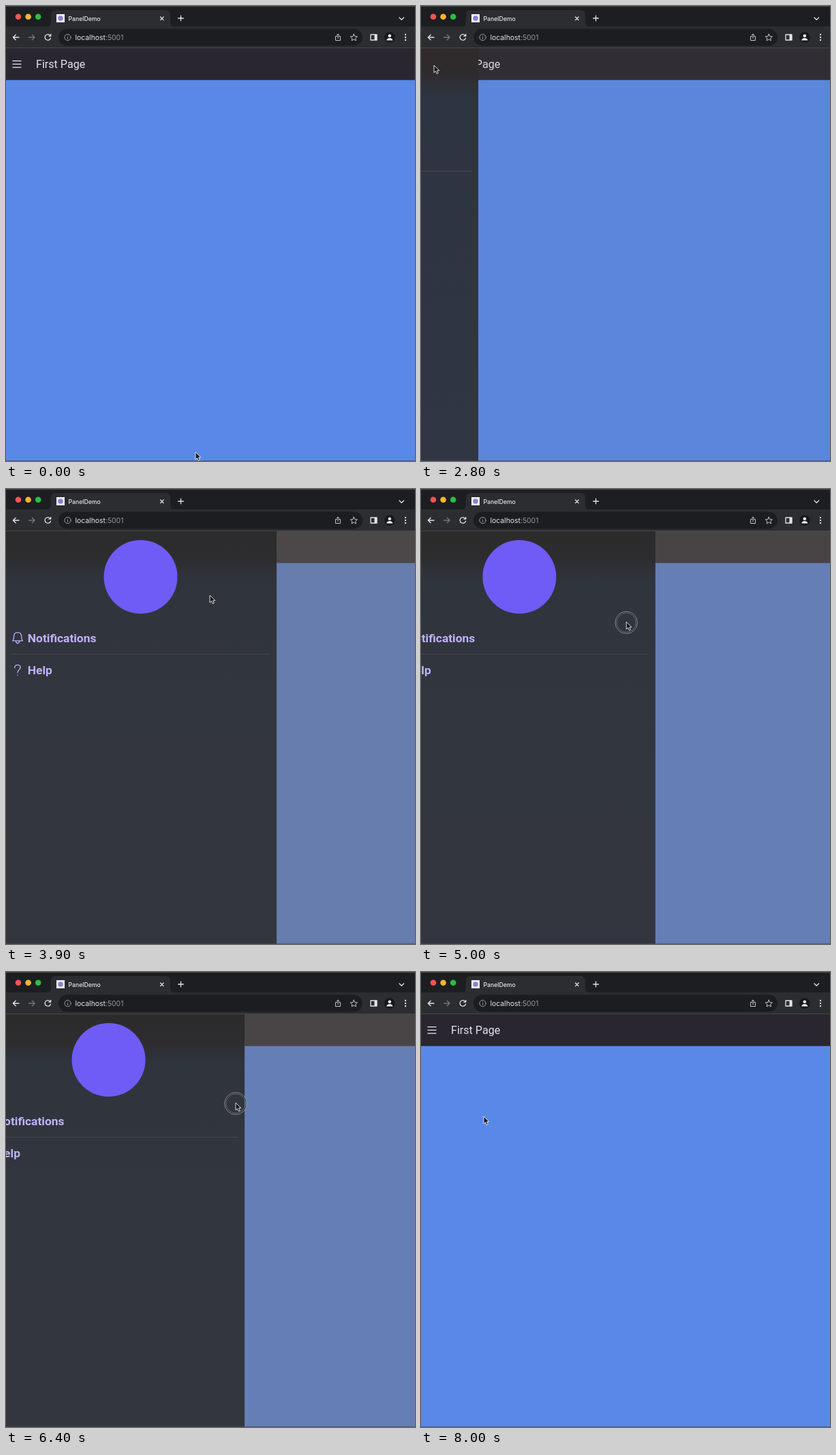
Recreate the animation shown at these times as an HTML page. Size 600 by 668 pixels, loop 8200 ms.

```html
<!DOCTYPE html>
<html lang="en">
<head>
<meta charset="utf-8">
<title>Drawer demo</title>
<style>
  html, body { margin: 0; width: 100%; height: 100%; overflow: hidden; background: #1d1e21; }
  svg { display: block; width: 100vw; height: 100vh; }
  .ui { font-family: Inter, Roboto, sans-serif; }
  .app { font-family: Roboto, Inter, sans-serif; }
  .icon, .lilac { fill: none; stroke-width: 1.3; stroke-linecap: round; stroke-linejoin: round; }
  .icon { stroke: #e4e5e7; }
  .lilac { stroke: #c0b2fa; }
  .fine { stroke: #c4c6c9; stroke-width: 1; }
  .muted { stroke: #9c9ea2; }
  .item { font-size: 17.4px; font-weight: 600; fill: #c0b2fa; }
</style>
</head>
<body>
<svg viewBox="0 0 600 668">
  <defs>
    <linearGradient id="panel" gradientUnits="userSpaceOnUse" x1="0" y1="62" x2="0" y2="668">
      <stop offset="0" stop-color="#2b2b2c"/>
      <stop offset=".06" stop-color="#2d2c2e"/>
      <stop offset=".115" stop-color="#2f343c"/>
      <stop offset=".4" stop-color="#32363e"/>
      <stop offset="1" stop-color="#34363d"/>
    </linearGradient>
    <linearGradient id="tint" gradientUnits="userSpaceOnUse" x1="0" y1="62" x2="0" y2="668">
      <stop offset="0" stop-color="#33292a"/>
      <stop offset=".06" stop-color="#2f2b2d"/>
      <stop offset=".12" stop-color="#2c3542"/>
      <stop offset="1" stop-color="#2f3644"/>
    </linearGradient>
    <clipPath id="page"><rect y="62" width="600" height="606"/></clipPath>
  </defs>

  <!-- Page -->
  <rect y="62" width="600" height="606" fill="#5988e8"/>
  <rect y="62" width="600" height="46.7" fill="#29262f"/>
  <path d="M9.5 80.7h13M9.5 85.4h13M9.5 90.1h13" stroke="#e9e7ec" stroke-width="1.2"/>
  <text class="app" x="44" y="91" font-size="16.1" fill="#e6e1e9">First Page</text>
  <rect id="scrim" y="62" width="600" height="606" fill="#777068"/>

  <!-- Drawer -->
  <g clip-path="url(#page)">
    <g id="drawer">
      <rect y="62" width="397" height="606" fill="url(#panel)"/>
      <rect id="cool" y="62" width="397" height="606" fill="url(#tint)"/>
      <circle cx="197.5" cy="129" r="54" fill="#6f5bf5"/>
      <g class="lilac">
        <path d="M9.8 222.9c1.4-1.6 1.8-3 1.8-6.4 0-3.7 2.2-5.9 5.5-5.9s5.5 2.2 5.5 5.900c0 3.400.4 4.800 1.800 6.400zM14.500 223.500c.3 2 1.300 3 2.600 3s2.300-1 2.600-3"/>
        <path d="M12.700 262.500c0-2.600 1.800-4.100 4.200-4.100s4.200 1.500 4.200 3.900c0 3.200-4.200 3.500-4.200 7.400M16.900 273.200v.2"/>
      </g>
      <text class="app item" x="31.8" y="224.5">Notifications</text>
      <text class="app item" x="31.8" y="272">Help</text>
      <path d="M8 242.500h380" stroke="#49444f"/>
    </g>
  </g>

  <!-- Browser frame -->
  <rect width="600" height="31" fill="#1d1e21"/>
  <rect width="600" height="1" fill="#4b4c4e"/>
  <rect y="30" width="600" height="32" fill="#2c2d31"/>
  <path d="M59 30.500q7 0 7-7V13q0-7 7-7h161q7 0 7 7v10.500q0 7 7 7z" fill="#2c2d31"/>
  <rect y="61" width="600" height="1" fill="#46474a"/>
  <circle cx="18" cy="15.800" r="4.300" fill="#fe5257"/>
  <circle cx="32.600" cy="15.800" r="4.300" fill="#fbb52e"/>
  <circle cx="47.200" cy="15.800" r="4.300" fill="#27c13f"/>
  <rect x="74" y="12" width="12" height="12" fill="#f4f4f8"/>
  <circle cx="80" cy="18" r="3.800" fill="#8583d8"/>
  <text class="ui" x="91.500" y="21.500" font-size="8.700" font-weight="500" fill="#e6e7e9">PanelDemo</text>
  <rect x="77" y="33.500" width="446" height="25" rx="12.500" fill="#1c1d20"/>
  <g class="icon">
    <path d="M226.500 16l4.600 4.600m0-4.600l-4.600 4.600"/>
    <path d="M252.700 18h7.600m-3.800-3.800v7.600"/>
    <path d="M577 17l3.300 3.200 3.300-3.200"/>
    <path d="M19 46h-8.500m3.700-3.800L10.400 46l3.800 3.800"/>
    <path d="M33.500 46H42m-3.700-3.800L42.100 46l-3.800 3.800" stroke="#74767a"/>
    <path d="M65 43.500a4.300 4.300 0 1 0 .5 3.700M65.700 41.300v2.800h-2.800"/>
    <g class="fine">
      <circle class="muted" cx="90.500" cy="46" r="4.600"/>
      <path class="muted" d="M90.500 45.700v2.500M90.500 43.800v.1"/>
      <path d="M485.500 44.500h-2v6h7v-6h-2M487 47.500v-6.300m-1.800 1.700l1.800-1.800 1.800 1.800"/>
      <path d="M510.300 41.200l1.500 3.300 3.600.4-2.700 2.400.8 3.500-3.200-1.800-3.200 1.800.8-3.500-2.700-2.400 3.600-.4z"/>
    </g>
    <rect x="535" y="42" width="9" height="8"/>
  </g>
  <rect x="540.500" y="42" width="3.500" height="8" fill="#e4e5e7"/>
  <circle cx="562.800" cy="46" r="7.800" fill="#17181a"/>
  <circle cx="562.800" cy="43.800" r="2.300" fill="#eceef0"/>
  <path d="M558.300 50.400c0-4.700 9-4.700 9 0z" fill="#eceef0"/>
  <path d="M586 42v.01M586 46v.01M586 50v.01" stroke="#dcdde0" stroke-width="2.400" stroke-linecap="round"/>
  <text class="ui" x="101.500" y="49.700" font-size="10.400" fill="#e6e7e9">localhost<tspan fill="#96989c">:5001</tspan></text>
  <path d="M0 667.500h600" stroke="#3b4a6d" stroke-opacity=".6"/>

  <!-- Pointer -->
  <g id="pointer">
    <g id="ring" fill="none">
      <circle cy="1" r="15.300" stroke="#17181b" stroke-width="1.200"/>
      <circle cy="1" r="16.200" stroke="#aaa" stroke-width=".8"/>
      <circle cy="1" r="14.300" stroke="#888" stroke-width=".7"/>
    </g>
    <path d="M0 0v10.800l2.500-2.300 1.700 4 2-.9-1.700-3.800h3.400z" fill="#141417" stroke="#f0f0f0" stroke-width=".9" stroke-linejoin="round"/>
  </g>
</svg>
<script>
const LOOP = 8200, STEP = 100, OPEN = 397;
const GRAB = 4700, RELEASE = 7400, CLOSED = 7600;
const LAG = 55, GRIP = 20;

// Places where the pointer rests or turns
const stops = [
  { t: 300, x: 278, y: 655 },
  { t: 600, x: 19, y: 87 },
  { t: 3600, x: 19, y: 87 },
  { t: 3900, x: 299, y: 156 },
  { t: 4500, x: 375, y: 183 },
  { t: GRAB, x: 375, y: 183 },
  { t: 5500, x: 136, y: 199 },
  { t: 6500, x: 342, y: 192 },
  { t: 7550, x: 92, y: 212 }
];

const progress = (t, from, to) => Math.min(1, Math.max(0, (t - from) / (to - from)));
const swing = k => (1 - Math.cos(Math.PI * k)) / 2;
const settle = k => 1 - (1 - k) ** 3;
const mix = (a, b, k) => a + (b - a) * k;

function pointerAt(t) {
  const next = stops.findIndex(stop => stop.t > t);
  if (next === 0) return stops[0];
  if (next < 0) return stops[stops.length - 1];
  const a = stops[next - 1], b = stops[next];
  const k = progress(t, a.t, b.t);
  return { x: mix(a.x, b.x, swing(k)), y: mix(a.y, b.y, settle(k)) };
}

// The drawer slides open, trails the dragging pointer, then snaps shut
function edgeAt(t) {
  if (t < GRAB) return OPEN * swing(progress(t, 2625, 3200));
  const dragged = pointerAt(Math.min(t, RELEASE) - LAG).x + GRIP;
  return Math.min(OPEN, dragged) * (1 - progress(t, RELEASE, CLOSED));
}

const pressed = t => (t >= 2300 && t < 2500) || (t >= GRAB && t < RELEASE);

const [scrim, drawer, cool, pointer, ring] =
  ['scrim', 'drawer', 'cool', 'pointer', 'ring'].map(id => document.getElementById(id));

function draw(t) {
  const { x, y } = pointerAt(t);
  const edge = edgeAt(t);
  const open = edge / OPEN;
  scrim.setAttribute('opacity', open * 0.46);
  drawer.setAttribute('transform', `translate(${edge - OPEN} 0)`);
  cool.setAttribute('opacity', 1 - open);
  pointer.setAttribute('transform', `translate(${x} ${y})`);
  ring.setAttribute('visibility', pressed(t) ? 'visible' : 'hidden');
}

const start = performance.now();
function tick() {
  const t = (performance.now() - start) % LOOP;
  draw(Math.floor(t / STEP) * STEP);
  requestAnimationFrame(tick);
}
tick();
</script>
</body>
</html>
```
